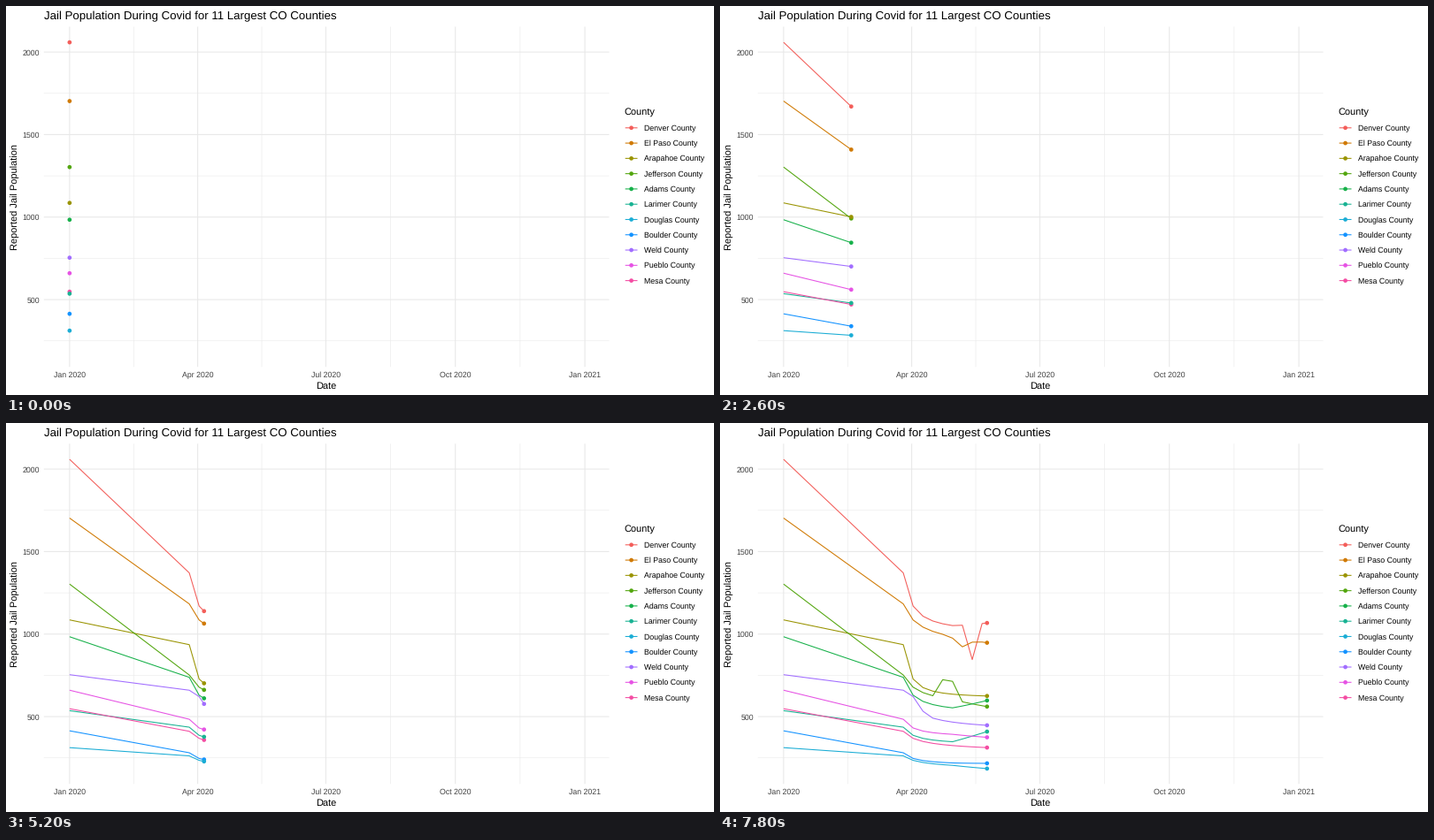
Animation of 800x440 px, one loop 8 s. Source, as a matplotlib script:

```python
import numpy as np
import matplotlib.pyplot as plt
from matplotlib.animation import FuncAnimation
from matplotlib.patches import Circle

W, H, DPI = 800, 440, 100
PX = 72 / DPI                     # points per pixel
FRAMES, STEP_MS = 40, 200

plt.rcParams.update({"font.family": "Liberation Sans", "text.hinting": "none"})

LEFT, RIGHT, TOP, BOTTOM = 42.8, 681.5, 23.4, 408.2
X0, PER_DAY = 71.85, 1.5908
Y_2000, PER_PERSON = 52.1, 0.18667
LINE_W, GRID_W, RADIUS = 1.07, 1.07, 2.35

# One reading on 1 January 2020, then weekly ones from 26 March.
WEEKS = np.arange(10)
DAYS = np.append(0, 85 + 7 * WEEKS)
KNOTS = np.round(DAYS / 365 * 99)     # animation step of each reading


def population(start, march, floor, power, rise, bump=(0, 0, 1)):
    """Power-law fall from march to floor, a late drift and one optional bump."""
    week, height, width = bump
    fall = (march - floor) / (1 + WEEKS) ** power
    drift = rise * np.maximum(WEEKS - 5, 0)
    swell = height * np.exp(-((WEEKS - week) / width) ** 2)
    return np.append(start, floor + fall + drift + swell)


COUNTIES = [
    ("Denver", "#F35E5A", population(2059, 1371, 1005, 1.15, 10, (7, -213, 0.4))),
    ("El Paso", "#D07A04", population(1703, 1183, 850, 0.5, -3, (6, -50, 0.8))),
    ("Arapahoe", "#9A9403", population(1086, 936, 614, 1.5, 0)),
    ("Jefferson", "#53A60F", population(1303, 752, 500, 0.5, -6, (4.5, 222, 0.6))),
    ("Adams", "#18B14B", population(984, 738, 510, 0.93, 17)),
    ("Larimer", "#1AB394", population(536, 436, 320, 0.8, 20)),
    ("Douglas", "#1BADD5", population(312, 262, 150, 0.4, -3)),
    ("Boulder", "#1493FF", population(414, 281, 200, 0.8, 1)),
    ("Weld", "#A26EFF", population(754, 656, 400, 0.75, 0, (1.2, 75, 0.7))),
    ("Pueblo", "#E653E4", population(660, 484, 370, 0.9, -3)),
    ("Mesa", "#F44DA3", population(548, 411, 265, 0.5, 0)),
]


def px(day):
    return X0 + np.asarray(day) * PER_DAY


def py(value):
    return Y_2000 + (2000 - np.asarray(value)) * PER_PERSON


fig = plt.figure(figsize=(W / DPI, H / DPI), dpi=DPI, facecolor="white")
ax = fig.add_axes([0, 0, 1, 1])
ax.set_xlim(0, W)
ax.set_ylim(H, 0)
ax.axis("off")


def stroke(x, y, color, width, z):
    return ax.plot(x, y, color=color, lw=width * PX, zorder=z, snap=False,
                   solid_capstyle="butt", solid_joinstyle="round")[0]


def dot(x, y, color, z):
    return ax.add_patch(Circle((x, y), RADIUS, fc=color, lw=0, zorder=z))


def label(x, y, text, size, color="black", **kw):
    ax.text(x, y, text, fontsize=size * PX, color=color, va="baseline", **kw)


def grid(days, values, width):
    for d in days:
        stroke([px(d)] * 2, [TOP, BOTTOM], "#E8E8E8", width, 1)
    for v in values:
        stroke([LEFT, RIGHT], [py(v)] * 2, "#E8E8E8", width, 1)


ticks = {0: "Jan 2020", 91: "Apr 2020", 182: "Jul 2020",
         274: "Oct 2020", 366: "Jan 2021"}
levels = range(500, 2001, 500)
quarters = np.array(list(ticks))
grid((quarters[:-1] + quarters[1:]) / 2, range(250, 1751, 500), GRID_W / 2)
grid(ticks, levels, GRID_W)

for day, name in ticks.items():
    label(px(day), 420, name, 8.8, "#404040", ha="center")
for v in levels:
    label(37.9, py(v) + 3.4, str(v), 8.8, "#404040", ha="right")

label(42.8, 15.2, "Jail Population During Covid for 11 Largest CO Counties", 13.2)
label(362, 433, "Date", 11, ha="center")
label(13.4, 216, "Reported Jail Population", 11, rotation=90,
      rotation_mode="anchor", ha="center")

label(698, 123, "County", 11)
lines, dots = [], []
for i, (name, color, values) in enumerate(COUNTIES):
    y = 137.8 + 17.28 * i
    stroke([699.7, 713.5], [y, y], color, LINE_W, 5)
    dot(706.6, y, color, 6)
    label(720.6, y + 3.2, name + " County", 8.8)
    lines.append(stroke([], [], color, LINE_W, 10 + i))
    dots.append(dot(X0, py(values[0]), color, 40 - i))


def update(step):
    done = KNOTS < step
    day = np.interp(step, KNOTS, DAYS)
    for (_, _, values), line, head in zip(COUNTIES, lines, dots):
        now = np.interp(step, KNOTS, values)
        line.set_data(px(np.append(DAYS[done], day)),
                      py(np.append(values[done], now)))
        head.center = px(day), py(now)
    return lines + dots


anim = FuncAnimation(fig, update, frames=FRAMES, interval=STEP_MS,
                     repeat=True, repeat_delay=0, blit=False)
plt.show()
```
